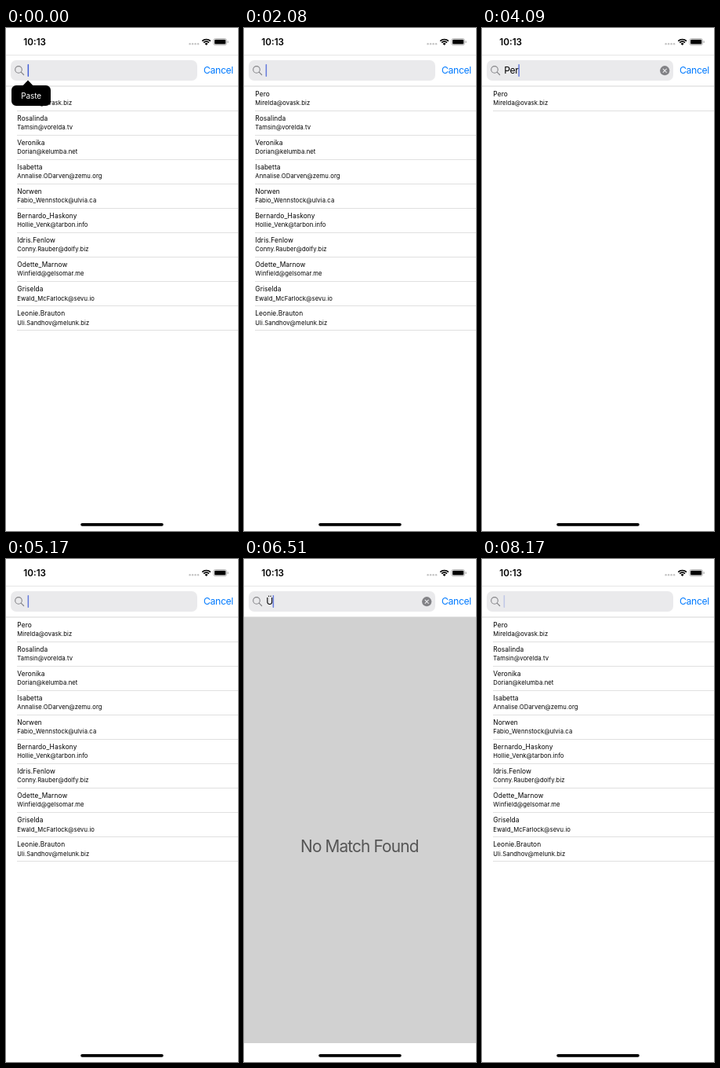
Animation of 296x640 px, one loop 8.25 s. Source, as an HTML page with a canvas:

```html
<!DOCTYPE html>
<html lang="en">
<head>
<meta charset="utf-8">
<title>User search</title>
<style>
  html, body { margin: 0; width: 100%; height: 100%; overflow: hidden; background: #fff; }
  canvas { display: block; width: 296px; height: 640px; }
</style>
</head>
<body>
<canvas id="stage"></canvas>
<script>
const W = 296, H = 640, LOOP = 8250;
const ROW_TOP = 74, ROW_H = 31.05;
const FAMILY = 'Inter, Roboto, sans-serif';
const FIELD = '#eaeaec';

const users = [
  ['Pero', 'Mirelda@ovask.biz'],
  ['Rosalinda', 'Tamsin@vorelda.tv'],
  ['Veronika', 'Dorian@kelumba.net'],
  ['Isabetta', 'Annalise.ODarven@zemu.org'],
  ['Norwen', 'Fabio_Wennstock@ulvia.ca'],
  ['Bernardo_Haskony', 'Hollie_Venk@tarbon.info'],
  ['Idris.Fenlow', 'Conny.Rauber@dolfy.biz'],
  ['Odette_Marnow', 'Winfield@gelsomar.me'],
  ['Griselda', 'Ewald_McFarlock@sevu.io'],
  ['Leonie.Brauton', 'Uli.Sandhov@melunk.biz']
];

// Each track is a list of [start in ms, value].
const queries = [[0, ''], [2940, 'P'], [3060, 'Pe'], [3180, 'Per'], [4700, ''], [5720, 'Ü'], [7040, '']];
const popup = [[0, 1], [1090, 0.5], [1200, 0]];
const ON = 0.8, MID = 0.55, LOW = 0.25;
const caret = [
  [0, 1], [430, MID], [550, LOW], [790, MID], [900, ON],
  [1600, MID], [1720, LOW], [1960, MID], [2080, ON],
  [2620, MID], [2740, LOW], [2940, 1],
  [3800, MID], [3920, LOW], [4090, ON],
  [4840, LOW], [5050, MID], [5170, ON],
  [5720, 1], [6110, MID], [6220, LOW], [6510, ON],
  [7160, LOW], [7390, MID], [7510, ON],
  [8050, MID], [8170, LOW]
];

const canvas = document.getElementById('stage');
const ctx = canvas.getContext('2d');
const dpr = window.devicePixelRatio || 1;
canvas.width = W * dpr;
canvas.height = H * dpr;

function at(track, t) {
  let value = track[0][1];
  for (const [start, v] of track) if (t >= start) value = v;
  return value;
}

function setFont(size, weight = 400, spacing = 0) {
  ctx.font = `${weight} ${size}px ${FAMILY}`;
  ctx.letterSpacing = spacing + 'px';
}

function text(str, x, y, color = '#000') {
  ctx.fillStyle = color;
  ctx.fillText(str, x, y);
}

function box(x, y, w, h, color, r = 0) {
  ctx.fillStyle = color;
  ctx.beginPath();
  ctx.roundRect(x, y, w, h, r);
  ctx.fill();
}

function disc(x, y, r, color) {
  ctx.fillStyle = color;
  ctx.beginPath();
  ctx.arc(x, y, r, 0, Math.PI * 2);
  ctx.fill();
}

function line(points, color, width) {
  ctx.strokeStyle = color;
  ctx.lineWidth = width;
  ctx.beginPath();
  points.forEach(([x, y], i) => i ? ctx.lineTo(x, y) : ctx.moveTo(x, y));
  ctx.stroke();
}

function drawWifi(x, y) {
  const from = -Math.PI * 0.75, to = -Math.PI * 0.25;
  ctx.lineCap = 'butt';
  ctx.strokeStyle = '#000';
  ctx.lineWidth = 1.7;
  for (const r of [7.5, 4.8]) {
    ctx.beginPath();
    ctx.arc(x, y, r, from, to);
    ctx.stroke();
  }
  ctx.fillStyle = '#000';
  ctx.beginPath();
  ctx.moveTo(x, y);
  ctx.arc(x, y, 2.9, from, to);
  ctx.fill();
}

function drawStatus() {
  setFont(11.7, 600);
  text('10:13', 22.3, 22);
  for (let i = 0; i < 4; i++) disc(234.6 + i * 3.5, 20.3, 1.2, '#c4c4c4');
  drawWifi(255.6, 22);
  ctx.strokeStyle = '#a6a6a6';
  ctx.lineWidth = 0.8;
  ctx.beginPath();
  ctx.roundRect(264.7, 13.5, 16.8, 8.3, 2.5);
  ctx.stroke();
  box(266, 14.7, 14.3, 5.9, '#000', 1.3);
  box(282.6, 16.2, 1.1, 2.9, '#a6a6a6', 0.5);
  box(0, 34, W, 1, '#e6e6e6');
}

function drawSearch(query, alpha) {
  box(6, 41, 238, 26, FIELD, 7);

  ctx.lineCap = 'round';
  ctx.strokeStyle = '#858589';
  ctx.lineWidth = 1.1;
  ctx.beginPath();
  ctx.arc(16, 52.9, 4.3, 0, Math.PI * 2);
  ctx.stroke();
  line([[19.2, 56.1], [22.6, 59.5]], '#858589', 1.2);

  setFont(12.15, 400, -0.3);
  text('Cancel', 252, 58.2, '#007aff');
  let caretX = 27.6;
  if (query) {
    text(query, 28.2, 58.4);
    caretX += ctx.measureText(query).width + 0.3;
    disc(233.2, 54.2, 6.1, '#828286');
    line([[231.1, 52.1], [235.3, 56.3]], FIELD, 1.1);
    line([[235.3, 52.1], [231.1, 56.3]], FIELD, 1.1);
  }
  ctx.globalAlpha = alpha;
  box(caretX, 46, 1.5, 16, '#425ed8', 0.7);
  ctx.globalAlpha = 1;
}

function drawList(rows) {
  box(0, 73.5, W, 1, '#d6d6d6');
  rows.forEach(([name, mail], i) => {
    const y = ROW_TOP + i * ROW_H;
    setFont(8.4, 400, 0.08);
    text(name, 14.3, y + 13);
    setFont(7.65, 400, 0.1);
    text(mail, 14.3, y + 24.1);
    box(14, Math.round(y + ROW_H - 0.4), W - 14, 1, '#e0e0e0');
  });
}

function drawEmpty() {
  box(0, 73.5, W, 542.5, '#d1d1d1');
  setFont(20.8, 400, -0.85);
  ctx.textAlign = 'center';
  text('No Match Found', 147.3, 372.7, '#555');
  ctx.textAlign = 'left';
}

function drawPopup(alpha) {
  if (!alpha) return;
  ctx.globalAlpha = alpha;
  ctx.fillStyle = '#000';
  ctx.beginPath();
  ctx.roundRect(7, 73, 50, 26, 6);
  ctx.moveTo(21.5, 73.2);
  ctx.lineTo(28, 66.5);
  ctx.lineTo(34.5, 73.2);
  ctx.fill();
  setFont(10, 400, -0.1);
  text('Paste', 19.2, 89.5, '#fff');
  ctx.globalAlpha = 1;
}

function draw(t) {
  const query = at(queries, t);
  const rows = users.filter(([name]) => name.startsWith(query));
  ctx.setTransform(dpr, 0, 0, dpr, 0, 0);
  box(0, 0, W, H, '#fff');
  drawStatus();
  if (rows.length) drawList(rows);
  else drawEmpty();
  drawSearch(query, at(caret, t));
  drawPopup(at(popup, t));
  box(95.2, 629.9, 105.6, 3.9, '#000', 1.95);
}

const begin = performance.now();
function tick() {
  draw((performance.now() - begin) % LOOP);
  requestAnimationFrame(tick);
}
tick();
</script>
</body>
</html>
```
